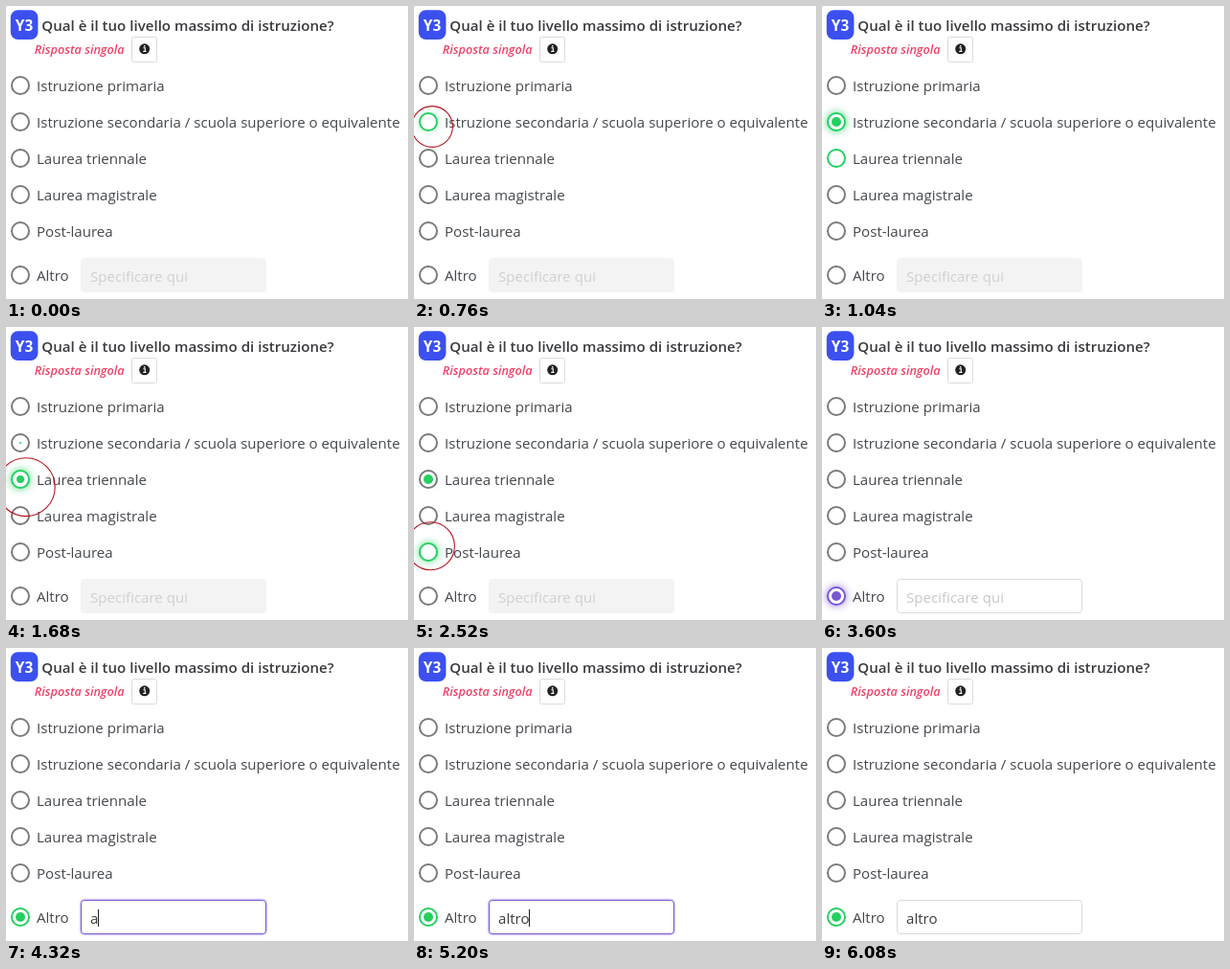
Write an HTML page that moves like this. It is 420 px wide and 306 px high and loops after 6.12 s.

```html
<!DOCTYPE html>
<html lang="it">
<head>
<meta charset="utf-8">
<style>
  html, body { margin: 0; width: 100%; height: 100%; overflow: hidden; background: #fff; }
  svg { display: block; width: 420px; height: 306px; }
  text { font: 15.08px "Open Sans", "Noto Sans", sans-serif; fill: #43474c; }
  .title { font-size: 15.1px; font-weight: 600; fill: #383a3d; }
  .badge { font-size: 15.4px; font-weight: 700; fill: #fff; text-anchor: middle; }
  .hint { font-size: 12.7px; font-weight: 600; font-style: italic; fill: #ee4466; }
  .glow { filter: blur(4px); }
</style>
</head>
<body>
<svg id="stage" viewBox="0 0 420 306">
  <rect x="4.8" y="4.2" width="28.6" height="30.8" rx="7.5" fill="#3b50ef"/>
  <text class="badge" x="19" y="26">Y3</text>
  <text class="title" x="37.3" y="26">Qual è il tuo livello massimo di istruzione?</text>
  <text class="hint" x="29.8" y="50">Risposta singola</text>
  <rect x="131.5" y="32.5" width="26" height="26" rx="2" fill="#fff" stroke="#dbdbdb"/>
  <circle cx="144.7" cy="44.8" r="5.5" fill="#222"/>
  <path d="M143.4 43.8h1.9v3.2M143.2 47.4h3.2" fill="none" stroke="#fff" stroke-width="1.1"/>
  <circle cx="144.7" cy="41.8" r=".9" fill="#fff"/>
  <g id="radios"></g>
  <rect id="focusRing" x="77.5" y="262.5" width="195" height="37" rx="5" fill="none" stroke="#7957d5" stroke-opacity=".25" stroke-width="2"/>
  <rect id="field" x="78.5" y="263.5" width="193" height="35" rx="3.5"/>
  <text id="value" x="88" y="288"></text>
  <rect id="caret" y="273" width="1" height="18" fill="#222"/>
  <circle id="ring" fill="none" stroke="#b8141f" stroke-width="1.1"/>
</svg>
<script>
const LOOP = 6120, STEP = 40, FADE = 150;
const GREEN = '#23d160', PURPLE = '#7957d5', GREY = '#7a7a7a';
const TYPING_START = 4320, ENABLED = 3440, CARET_OFF = 5480, BLUR = 5960;
const $ = id => document.getElementById(id);

// times: hover, focus, check, blur, uncheck
const options = [
  { label: 'Istruzione primaria', y: 83 },
  { label: 'Istruzione secondaria / scuola superiore o equivalente', y: 121, times: [400, 720, 865, 1440, 1585] },
  { label: 'Laurea triennale', y: 159, times: [960, 1440, 1585, 2400, 2535] },
  { label: 'Laurea magistrale', y: 197 },
  { label: 'Post-laurea', y: 235, times: [2080, 2400, 2535, 3360, 3440] },
  { label: 'Altro', y: 281, other: true, times: [3160, 3360, 3440, Infinity, Infinity] }
];

// click ripples: start, end, x, y, first radius
const clicks = [
  [720, 1000, 19, 126, 19.6],
  [1440, 1720, 20.8, 167.2, 19.6],
  [2400, 2680, 17.4, 228.8, 19.6],
  [3360, 3560, 20, 282, 19.6],
  [4040, 4120, 89.5, 279.5, 39]
];

const keys = [[4320, 'a'], [4560, 'al'], [4680, 'alt'], [4880, 'altr'], [4920, 'altro']];

function add(tag, attrs) {
  const node = document.createElementNS('http://www.w3.org/2000/svg', tag);
  set(node, attrs);
  return $('radios').appendChild(node);
}

function set(node, attrs) {
  for (const name in attrs) node.setAttribute(name, attrs[name]);
}

function show(node, visible) {
  node.style.display = visible ? '' : 'none';
}

function easeOut(elapsed) {
  const p = Math.min(1, Math.max(0, elapsed / FADE));
  return 1 - (1 - p) ** 1.6;
}

for (const option of options) {
  const at = { cx: 15, cy: option.y };
  option.glow = add('circle', { ...at, r: 10, class: 'glow' });
  option.circle = add('circle', { ...at, r: 9, fill: '#fff', 'stroke-width': 2 });
  option.dot = add('circle', at);
  add('text', { x: 32, y: option.y + 6 }).textContent = option.label;
}

function drawRadio({ times, other, glow, circle, dot }, t) {
  const [hover, focus, check, blur, uncheck] = times || Array(5).fill(Infinity);
  const accent = other && t < TYPING_START ? PURPLE : GREEN;
  const glowLevel = t >= TYPING_START ? 0 : easeOut(t - focus) - easeOut(t - blur);
  set(circle, { stroke: t >= hover && t < blur ? accent : GREY });
  set(glow, { fill: accent, opacity: 0.8 * glowLevel });
  set(dot, { fill: accent, r: 5 * (easeOut(t - check) - easeOut(t - uncheck)) });
}

function drawField(t) {
  const enabled = t >= ENABLED;
  const focused = t >= TYPING_START && t < BLUR;
  const typed = keys.filter(([start]) => t >= start).pop();
  const value = $('value');
  set($('field'), {
    fill: enabled ? '#fff' : '#f3f3f3',
    stroke: focused ? PURPLE : enabled ? '#dbdbdb' : '#f3f3f3'
  });
  show($('focusRing'), focused);
  value.textContent = typed ? typed[1] : 'Specificare qui';
  value.style.fill = typed ? '#3c3c3c' : enabled ? '#c8c8c8' : '#d0d0d0';
  show($('caret'), focused && t < CARET_OFF);
  if (focused) set($('caret'), { x: Math.round(88 + value.getComputedTextLength()) });
}

function drawRing(t) {
  const click = clicks.find(([start, end]) => t >= start && t < end);
  show($('ring'), click);
  if (!click) return;
  const [start, , cx, cy, radius] = click;
  set($('ring'), { cx, cy, r: radius + 0.045 * (t - start) });
}

function frame(now) {
  const t = Math.floor((now % LOOP) / STEP) * STEP;
  options.forEach(option => drawRadio(option, t));
  drawField(t);
  drawRing(t);
}

const origin = performance.now();
function tick() {
  frame(performance.now() - origin);
  requestAnimationFrame(tick);
}
tick();
</script>
</body>
</html>
```
